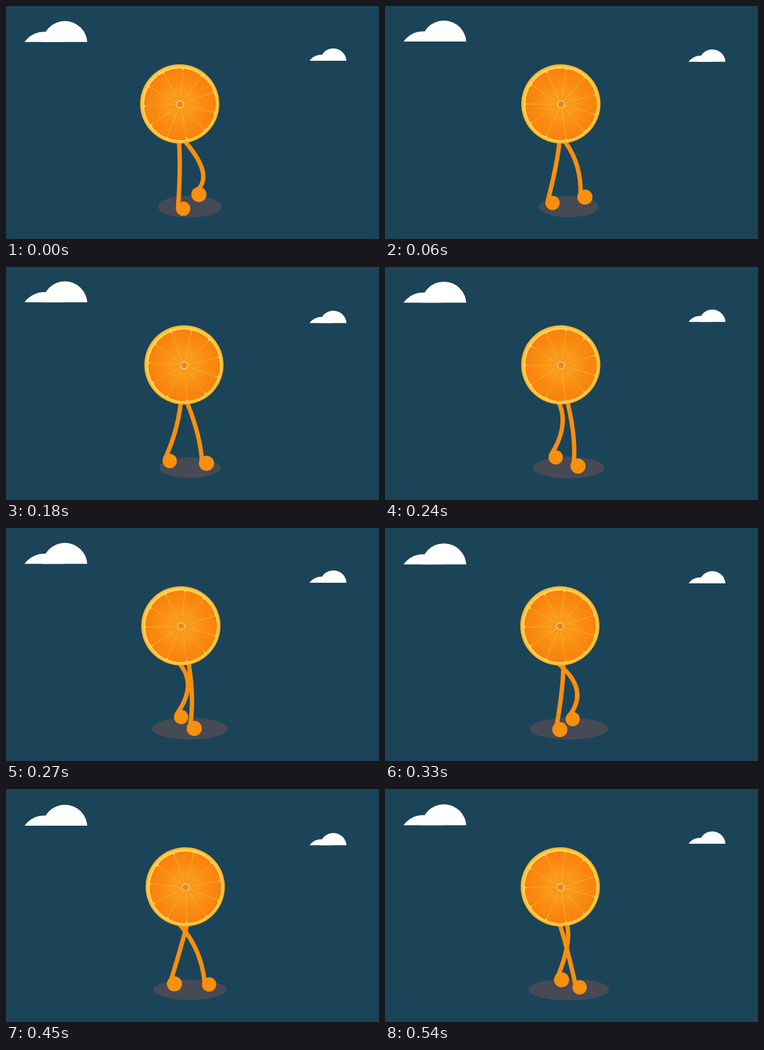
An HTML page with a canvas for the animation above (0.57 s loop, 640 by 400 pixels).

```html
<!DOCTYPE html>
<html lang="en">
<head>
<meta charset="utf-8">
<title>Walking orange</title>
<style>
html, body { margin: 0; width: 100%; height: 100%; overflow: hidden; background: #1b4459; }
canvas { display: block; width: 640px; height: 400px; }
</style>
</head>
<body>
<canvas id="stage" width="640" height="400"></canvas>
<script>
const ctx = document.getElementById('stage').getContext('2d');
const LOOP = 570, STEP = 30, TAU = Math.PI * 2, RAD = Math.PI / 180;
const ORANGE = '#f98f0f';

// Key poses; every track below has one value per key time.
const times = [0, 60, 120, 180, 270, 330, 390, 450, 540];
const bodyX = [298, 301.8, 306.5, 305.3, 300, 300, 304.5, 307.5, 300.7];
const shadowW = [54.5, 51.5, 51.5, 52.5, 65, 67, 64, 63, 69];
const legs = [
  {
    size: 12.3,
    hip: [297, 299, 299.5, 299.5, 300, 301, 301.5, 301, 301],
    kneeX: [298, 292, 289, 290, 312, 329, 330, 328, 312],
    kneeY: [285, 280, 281, 283, 274, 278, 278, 280, 274],
    footX: [304, 287.5, 275, 281, 300.5, 322, 345, 348.5, 334],
    footY: [348, 338, 334, 333, 324.5, 328, 332, 335.5, 340.5],
    tilt: [14, 28, 26, 23, 39, 63, 42, 30, 36]
  },
  {
    size: 13,
    hip: [310, 311, 312, 312, 314, 306, 308, 310, 313],
    kneeX: [337, 330, 331, 329, 319, 303, 298, 297, 312],
    kneeY: [282, 276, 281, 288, 290, 282, 282, 282, 272],
    footX: [331, 343, 349, 344, 323, 300, 286.5, 289, 303],
    footY: [323.5, 328, 333, 337, 344, 346, 340, 334.5, 327.5],
    tilt: [84, 34, 31, 29, 41, 53, 53, 52, 48]
  }
];

// Periodic cubic through the key values.
function sample(track, t) {
  const n = times.length;
  const at = i => times[(i + n) % n] + LOOP * Math.floor(i / n);
  const val = i => track[(i + n) % n];
  const slope = i => (val(i + 1) - val(i - 1)) / (at(i + 1) - at(i - 1));
  let i = n - 1;
  while (times[i] > t) i--;
  const h = at(i + 1) - at(i), u = (t - at(i)) / h, v = 1 - u;
  return v * v * (1 + 2 * u) * val(i) + u * u * (3 - 2 * u) * val(i + 1)
    + h * u * v * (v * slope(i) - u * slope(i + 1));
}

function disc(x, y, r, fill) {
  ctx.fillStyle = fill;
  ctx.beginPath();
  ctx.arc(x, y, r, 0, TAU);
  ctx.fill();
}

function radial(r0, r1, ...stops) {
  const g = ctx.createRadialGradient(0, 0, r0, 0, 0, r1);
  stops.forEach((c, i) => g.addColorStop(i / (stops.length - 1), c));
  return g;
}

// x, y: left end of the flat base
function cloud(x, y, scale) {
  ctx.save();
  ctx.translate(x, y);
  ctx.scale(scale, scale);
  ctx.beginPath();
  ctx.rect(-2, -45, 114, 45);
  ctx.clip();
  disc(33, 22.5, 40, '#fff');
  disc(69, 2.5, 38.5, '#fff');
  ctx.restore();
}

function leg(l, t) {
  const hipX = sample(l.hip, t), hipY = 236;
  const kx = sample(l.kneeX, t), ky = sample(l.kneeY, t);
  const fx = sample(l.footX, t), fy = sample(l.footY, t);
  const a = sample(l.tilt, t) * RAD;
  const ax = fx - 9 * Math.cos(a), ay = fy - 9 * Math.sin(a);
  const cx = 2 * kx - (hipX + ax) / 2, cy = 2 * ky - (hipY + ay) / 2;
  const len = Math.hypot(cx - hipX, cy - hipY);
  ctx.strokeStyle = ORANGE;
  ctx.lineWidth = 7.5;
  ctx.lineCap = 'round';
  ctx.beginPath();
  ctx.moveTo(hipX - (cx - hipX) / len * 6, hipY - (cy - hipY) / len * 6);
  ctx.lineTo(hipX, hipY);
  ctx.quadraticCurveTo(cx, cy, ax, ay);
  ctx.stroke();
  disc(fx, fy, l.size, ORANGE);
}

function slice(x) {
  ctx.save();
  ctx.translate(x, 168);
  ctx.rotate((x - 298) * 0.93 * RAD);
  disc(0, 0, 68, radial(60, 68, '#ffdd78', '#fdcb4a', '#f5ac1c'));
  ctx.translate(0.5, 0.7);
  disc(0, 0, 61.5, radial(0, 61.5, '#f8931a', '#fb9a18', '#f98b10', '#f9820d'));
  for (let i = 0; i < 11; i++) {
    ctx.save();
    ctx.rotate((5 + i * 360 / 11) * RAD);
    ctx.strokeStyle = '#fbb53a';
    ctx.lineWidth = 0.8;
    ctx.beginPath();
    ctx.moveTo(0, -7);
    ctx.lineTo(0, -60);
    ctx.stroke();
    ctx.fillStyle = '#ffd563';
    ctx.beginPath();
    ctx.moveTo(-4, -62);
    ctx.quadraticCurveTo(-0.8, -61.3, 0, -58);
    ctx.quadraticCurveTo(0.8, -61.3, 4, -62);
    ctx.fill();
    ctx.restore();
  }
  disc(0, 0, 6, '#f0841a');
  ctx.strokeStyle = '#fde9a8';
  ctx.lineWidth = 1.6;
  ctx.lineCap = 'butt';
  ctx.setLineDash([2.6, 0.827]);
  ctx.beginPath();
  ctx.arc(0, 0, 6, 0, TAU);
  ctx.stroke();
  ctx.restore();
}

function draw(t) {
  const x = sample(bodyX, t);
  ctx.fillStyle = '#1b4459';
  ctx.fillRect(0, 0, 640, 400);
  ctx.fillStyle = '#193e52';
  ctx.fillRect(0, 399, 640, 1);
  cloud(32, 61.8 - 1.3 * Math.sin(TAU * t / LOOP), 1);
  cloud(521, 95.5 - 1.6 * Math.cos(TAU * (t + 15) / (LOOP / 2)), 0.588);
  ctx.fillStyle = '#464a54';
  ctx.beginPath();
  ctx.ellipse(315.5, 344.5, sample(shadowW, t), 19 - (x - 298) * 0.16, 0, 0, TAU);
  ctx.fill();
  legs.forEach(l => leg(l, t));
  slice(x);
}

const start = performance.now();
function tick() {
  const t = (performance.now() - start) % LOOP;
  draw(Math.floor(t / STEP) * STEP);
  requestAnimationFrame(tick);
}
tick();
</script>
</body>
</html>
```
